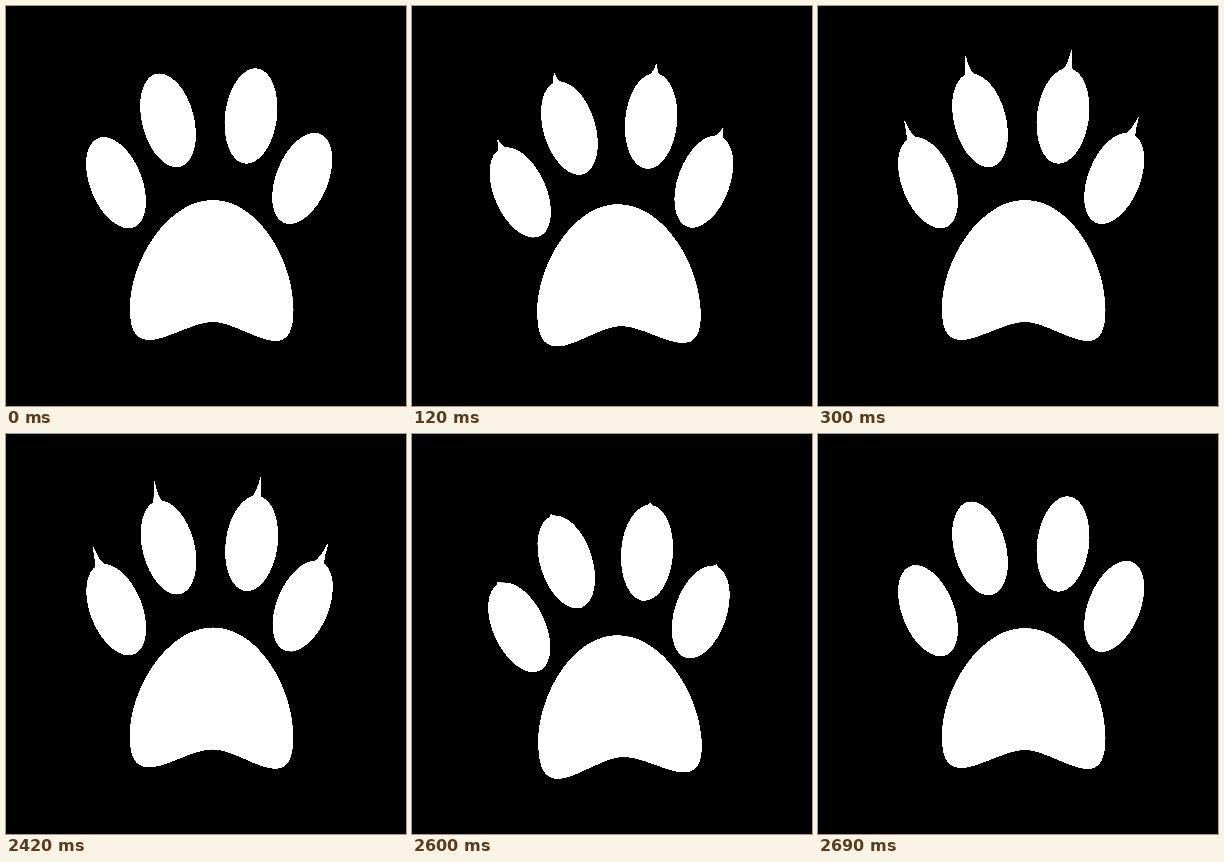
An HTML page with a canvas for the animation above (3.72 s loop, 400x400 px).

```html
<!DOCTYPE html>
<html lang="en">
<head>
<meta charset="utf-8">
<title>Paw</title>
<style>
  html, body { margin: 0; width: 100%; height: 100%; overflow: hidden; background: #000; }
  /* high contrast gives the hard two-tone edges */
  canvas { display: block; width: 100vw; height: 100vh; filter: contrast(10); }
</style>
</head>
<body>
<canvas id="stage" width="400" height="400"></canvas>
<script>
const ctx = document.getElementById('stage').getContext('2d');
const LOOP = 3720, STEP = 30, STEPS = 10, RETRACT = 2420;
const RAD = Math.PI / 180;
const TOE_A = 48, TOE_B = 26;
const TOE_MID = 235, SQUEEZE = 0.022;

// side: claw mirroring, tip: sideways offset of the claw tip
const toes = [
  { x: 110, y: 176.7, tilt: -21.8, side: 1, tip: 1.2 },
  { x: 162, y: 114.3, tilt: -14.6, side: 1, tip: 2.3 },
  { x: 245, y: 110, tilt: 7.4, side: -1, tip: 0 },
  { x: 296.2, y: 172.4, tilt: 22, side: -1, tip: -0.6 }
];

const pad = new Path2D(
  'M207 194C252 194 287.5 254 287.5 303C287.5 323 283 335 270 335' +
  'C252 335 226 316 207 316C188 316 160 334 144 334' +
  'C130 334 124 325 124 303C124 254 162 194 207 194Z');

// [step, paw swing, claw length]
const keys = [[0, 0, 0], [3, 1, 0.13], [6, -0.25, 1.3], [10, 0, 1]];

function poseAt(step) {
  const i = Math.max(1, keys.findIndex(k => k[0] >= step));
  const [a, b] = [keys[i - 1], keys[i]];
  const u = (step - a[0]) / (b[0] - a[0]);
  const mix = n => a[n] + (b[n] - a[n]) * u;
  return { swing: mix(1), claw: mix(2) };
}

function stepAt(t) {
  if (t < RETRACT) return Math.min(STEPS, Math.floor(t / STEP));
  return Math.max(0, STEPS - 1 - Math.floor((t - RETRACT) / STEP));
}

function swung(px, py, swing, paint) {
  ctx.save();
  ctx.translate(px, py);
  ctx.rotate(-3.44 * RAD * swing);
  ctx.translate(-px, -py);
  paint();
  ctx.restore();
}

function drawClaw(side, tip, len) {
  const tx = tip * Math.min(1, len) + Math.max(0, len - 1) * 6;
  const ty = -18.2 * len;
  ctx.beginPath();
  ctx.moveTo(-3.8 * side, 2);
  ctx.quadraticCurveTo(-1.3 * side, -7 * len, tx - 0.4 * side, ty);
  ctx.lineTo(tx + 0.4 * side, ty);
  ctx.quadraticCurveTo(2 * side, -3 * len, 6.2 * side, 2);
  ctx.fill();
}

function drawToe({ x, y, tilt, side, tip }, { swing, claw }) {
  ctx.save();
  ctx.translate(x + (TOE_MID - x) * SQUEEZE * swing, y);
  ctx.rotate(tilt * RAD);
  ctx.beginPath();
  ctx.ellipse(0, 0, TOE_B, TOE_A, 0, 0, Math.PI * 2);
  ctx.fill();
  ctx.translate(0, -TOE_A);
  if (claw > 0) drawClaw(side, tip, claw);
  ctx.restore();
}

function frame(now) {
  const pose = poseAt(stepAt(now % LOOP));
  ctx.fillStyle = '#000';
  ctx.fillRect(0, 0, 400, 400);
  ctx.fillStyle = '#fff';
  swung(327, 269, pose.swing, () => ctx.fill(pad));
  swung(387, 277, pose.swing, () => toes.forEach(toe => drawToe(toe, pose)));
}

const start = performance.now();
function tick() {
  frame(performance.now() - start);
  requestAnimationFrame(tick);
}
tick();
</script>
</body>
</html>
```
